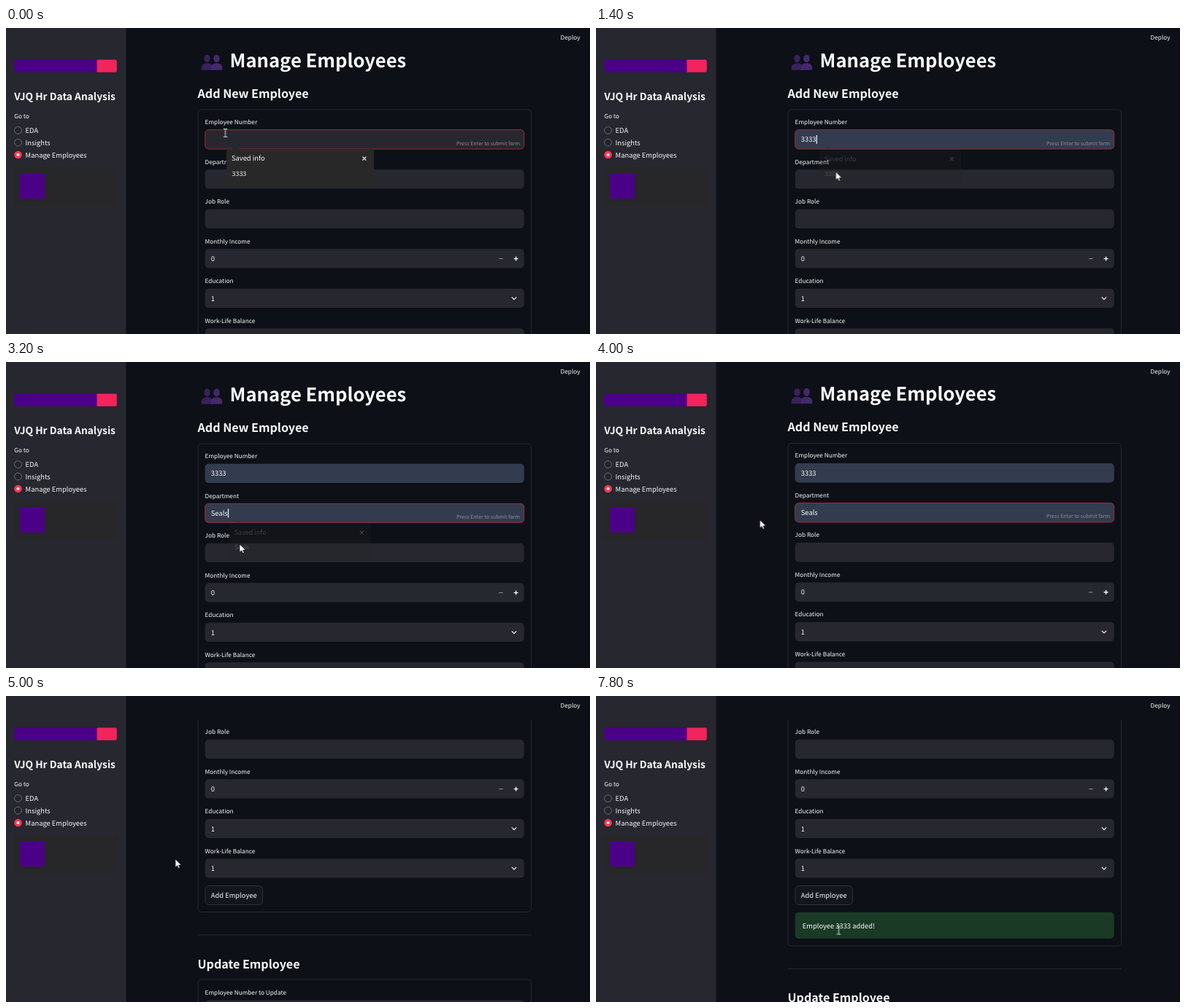
Recreate the animation shown at these times as an HTML page. Size 800 by 420 pixels, loop 8000 ms.

```html
<!DOCTYPE html>
<html lang="en">
<head>
<meta charset="utf-8">
<title>Manage Employees</title>
<style>
html, body { margin: 0; width: 100%; height: 100%; overflow: hidden; background: #0d1016; }
svg { display: block; }
text {
  font: 400 9.35px "Noto Sans CJK JP", "Noto Sans CJK SC", "Noto Sans CJK", "Open Sans", sans-serif;
  fill: #fafafa;
  text-rendering: geometricPrecision;
}
.label text, text.label { font-size: 8.24px; }
.title { font-size: 25.6px; font-weight: 700; }
.heading { font-size: 16.1px; font-weight: 600; }
.brand { font-size: 13.75px; font-weight: 600; }
.hint { font-size: 7.04px; fill: #8d8e94; text-anchor: end; }
.popup text { font: 8.6px "Noto Sans", "Open Sans", sans-serif; }
.popup .small { font-size: 7.6px; }
.line { fill: none; stroke: #fafafa; stroke-width: 1.2; }
.edge { fill: none; stroke: #272930; }

.a { animation: 8s step-end infinite; }
.scroll { animation-name: scroll; }
.focus { animation-name: focus; }
.fill1 { animation-name: fill1; }
.fill2 { animation-name: fill2; }
.caret1 { animation-name: caret1; }
.caret2 { animation-name: caret2; }
.popup1 { animation-name: popup1; }
.popup2 { animation-name: popup2; }
.button { animation-name: hover; }
.success { animation-name: success; }
.card { animation-name: grow; }
.below { animation-name: below; }
.cursor { animation-name: move; }
.ibeam { animation-name: ibeam; }
.arrow { animation-name: arrow; }
.hand { animation-name: hand; }

@keyframes scroll {
  0% { transform: translateY(0); }
  45% { transform: translateY(-.6px); }
  52.5% { transform: translateY(-70px); }
  55% { transform: translateY(-126.4px); }
  57.5% { transform: translateY(-160px); }
  60%, 100% { transform: translateY(-189px); }
}
@keyframes focus {
  0% { transform: none; }
  27.5%, 100% { transform: translateY(54.5px); }
}
@keyframes fill1 { 0% { opacity: 0; } 10%, 100% { opacity: 1; } }
@keyframes fill2 { 0% { opacity: 0; } 37.5%, 100% { opacity: 1; } }
@keyframes caret1 { 0% { opacity: 0; } 17.5% { opacity: 1; } 22.5%, 100% { opacity: 0; } }
@keyframes caret2 {
  0%, 47.5% { opacity: 0; }
  40%, 52.5% { opacity: 1; }
  57.5%, 100% { opacity: 0; }
}
@keyframes popup1 {
  0% { opacity: 1; transform: none; }
  17.5% { opacity: .2; transform: translate(16.1px, 7.6px) scale(.96); }
  20%, 100% { opacity: 0; transform: none; }
}
@keyframes popup2 {
  0% { opacity: 0; transform: none; }
  27.5% { opacity: 1; transform: none; }
  40% { opacity: .2; transform: translate(16.1px, 7.6px) scale(.96); }
  42.5%, 100% { opacity: 0; transform: none; }
}
@keyframes hover { 0%, 90%, 100% { fill: #13161e; } 70% { fill: #26272f; } }
@keyframes success { 0% { opacity: 0; } 87.5%, 100% { opacity: 1; } }
@keyframes grow { 0% { height: 373.5px; } 87.5%, 100% { height: 420px; } }
@keyframes below { 0% { transform: none; } 87.5%, 100% { transform: translateY(46.5px); } }
@keyframes move {
  0% { transform: translate(300.5px, 144px); }
  2.5% { transform: translate(303px, 150px); }
  5% { transform: translate(308px, 163px); }
  7.5% { transform: translate(316px, 180px); }
  10% { transform: translate(324px, 193px); }
  12.5% { transform: translate(328px, 197px); }
  15% { transform: translate(328.5px, 197.5px); }
  22.5% { transform: translate(325px, 204px); }
  25% { transform: translate(318px, 208px); }
  30% { transform: translate(317px, 222px); }
  32.5% { transform: translate(317.7px, 239.7px); }
  35% { transform: translate(319px, 248px); }
  37.5% { transform: translate(320px, 250px); }
  42.5% { transform: translate(318px, 249px); }
  45% { transform: translate(270px, 232px); }
  47.5% { transform: translate(228px, 218px); }
  50% { transform: translate(224.5px, 216.8px); }
  62.5% { transform: translate(232px, 224px); }
  65% { transform: translate(250px, 241px); }
  67.5% { transform: translate(268px, 258px); }
  70% { transform: translate(285px, 271px); }
  72.5% { transform: translate(291px, 276.8px); }
  90% { transform: translate(300px, 291px); }
  92.5% { transform: translate(318px, 317px); }
  95% { transform: translate(330px, 326px); }
  97.5%, 100% { transform: translate(332.5px, 321.5px); }
}
@keyframes ibeam {
  0%, 22.5%, 92.5%, 100% { opacity: 1; }
  7.5%, 30% { opacity: 0; }
}
@keyframes arrow {
  0%, 22.5%, 70%, 92.5%, 100% { opacity: 0; }
  7.5%, 30%, 90% { opacity: 1; }
}
@keyframes hand { 0%, 90%, 100% { opacity: 0; } 70% { opacity: 1; } }
</style>
</head>
<body>
<svg width="800" height="420" viewBox="0 0 800 420">
  <defs>
    <clipPath id="page"><rect x="165" y="33" width="635" height="387"/></clipPath>
    <rect id="box" x="272.7" y="139.7" width="437" height="26.4" rx="5"/>
    <path id="chevron" class="line" d="M692.8 151.4l3.2 3.2 3.2-3.2"/>
    <g id="bust">
      <ellipse cx="0" cy="-5" rx="4.3" ry="5.4"/>
      <path d="M-7.8 10.8V7.2Q-7.6 2.6-2 1.6H2Q7.6 2.6 7.8 7.2V10.8Z"/>
    </g>
    <g id="panel">
      <path d="M308 167l6.5-6 6.5 6" fill="#282828" stroke="#3a3a3a" stroke-width=".5"/>
      <rect x="302" y="166.3" width="202" height="51.5" rx="3" fill="#282828"/>
      <text class="small" x="309" y="182.4">Saved info</text>
      <path class="line" stroke-width="1" d="M488.3 176.6l5 5m0-5l-5 5"/>
    </g>
  </defs>

  <rect width="800" height="420" fill="#0d1016"/>
  <text class="label" x="759.6" y="16.4">Deploy</text>

  <g clip-path="url(#page)">
    <g class="a scroll">
      <use href="#bust" x="275.5" y="47" fill="#38215c"/>
      <use href="#bust" x="288.5" y="47" fill="#43296c"/>
      <text class="title" x="306.6" y="53.6">Manage Employees</text>
      <text class="heading" x="262.5" y="96">Add New Employee</text>
      <rect class="a card edge" x="263" y="112" width="456.5" height="373.5" rx="5"/>

      <g class="label">
        <text x="272.6" y="132">Employee Number</text>
        <text x="272.6" y="186.5">Department</text>
        <text x="272.6" y="241">Job Role</text>
        <text x="272.6" y="295.5">Monthly Income</text>
        <text x="272.6" y="350">Education</text>
        <text x="272.6" y="404.5">Work-Life Balance</text>
      </g>
      <g fill="#26272f">
        <use href="#box"/>
        <use href="#box" y="54.5"/>
        <use href="#box" y="109"/>
        <use href="#box" y="163.5"/>
        <use href="#box" y="218"/>
        <use href="#box" y="272.5"/>
      </g>
      <text x="280.8" y="320">0</text>
      <path class="line" d="M675.2 316.6h5.4" style="stroke:#85868c"/>
      <path class="line" d="M695.7 316.6h5.8m-2.9-2.9v5.8" style="stroke-width:1.4"/>
      <text x="280.8" y="374.5">1</text>
      <use href="#chevron" y="218"/>
      <text x="280.8" y="429">1</text>
      <use href="#chevron" y="272.5"/>

      <g class="a fill1">
        <use href="#box" fill="#333b4f"/>
        <text x="280.8" y="156.4">3333</text>
      </g>
      <g class="a fill2">
        <use href="#box" y="54.5" fill="#333b4f"/>
        <text x="280.8" y="210.9">Seals</text>
      </g>
      <path class="a caret1 line" stroke-width=".9" d="M302.3 147v12"/>
      <path class="a caret2 line" stroke-width=".9" d="M304.5 201.5v12"/>
      <g class="a focus">
        <use href="#box" fill="none" stroke="#b02c39" stroke-width=".9"/>
        <text class="hint" x="704" y="160.6">Press Enter to submit form</text>
      </g>

      <rect class="a button" x="273" y="449.5" width="78.5" height="26" rx="5" fill="#13161e" stroke="#30323a"/>
      <text x="280.8" y="466">Add Employee</text>
      <g class="a success">
        <rect x="272.7" y="485.7" width="437" height="36.3" rx="5" fill="#1a3a26"/>
        <text x="282.8" y="507.6">Employee 3333 added!</text>
      </g>

      <g class="a below">
        <path class="edge" d="M262.5 517H720"/>
        <text class="heading" x="262.5" y="562.8">Update Employee</text>
        <rect class="edge" x="263" y="578" width="456.5" height="300" rx="5"/>
        <text class="label" x="272.6" y="598.6">Employee Number to Update</text>
        <use href="#box" y="466.7" fill="#26272f"/>
      </g>

      <g class="a popup popup1">
        <use href="#panel"/>
        <text x="309.6" y="203.3">3333</text>
      </g>
      <g transform="translate(0 54.5)">
        <g class="a popup popup2">
          <use href="#panel"/>
          <text x="309.6" y="203.3">Seals</text>
        </g>
      </g>
    </g>
  </g>

  <rect width="164.5" height="420" fill="#26272f"/>
  <rect x="11.3" y="43.5" width="140.5" height="17.2" rx="2" fill="#4b0088"/>
  <path d="M124.5 43.5h25.3a2 2 0 0 1 2 2v13.2a2 2 0 0 1-2 2h-25.3z" fill="#f2245a"/>
  <text class="brand" x="11.2" y="99">VJQ Hr Data Analysis</text>
  <text class="label" x="11.3" y="124">Go to</text>
  <g fill="#23242c" stroke="#74757b" stroke-width=".9">
    <circle cx="16.5" cy="140.5" r="4.9"/>
    <circle cx="16.5" cy="157.2" r="4.9"/>
  </g>
  <circle cx="16.5" cy="174" r="5.3" fill="#ff3650"/>
  <circle cx="16.5" cy="174" r="2" fill="#fff"/>
  <text x="26.6" y="144">EDA</text>
  <text x="26.6" y="160.8">Insights</text>
  <text x="26.6" y="177.5">Manage Employees</text>
  <rect x="11.3" y="191" width="140.5" height="53" fill="#272628"/>
  <rect x="19" y="200" width="34" height="34" fill="#4b0088"/>

  <g class="a cursor">
    <path class="a ibeam line" style="stroke-width:.9" d="M-2.6-5.5H-.7L0-5 .7-5.5H2.6M0-5V5M-2.6 5.5H-.7L0 5 .7 5.5H2.6"/>
    <path class="a arrow" d="M0 0V11.2L2.6 8.8 4.4 12.6 6.2 11.8 4.5 8.1H8.2Z" fill="#fff" stroke="#000" stroke-width=".6"/>
    <path class="a hand" d="M-1.2 1a1.2 1.2 0 0 1 2.4 0V4.6l4.2 1q1.4.4 1.2 1.8L6 12H-.6L-4 7.6q.2-1.4 1.6-.8l1.2 1Z" fill="#fff" stroke="#000" stroke-width=".6"/>
  </g>
</svg>
</body>
</html>
```
